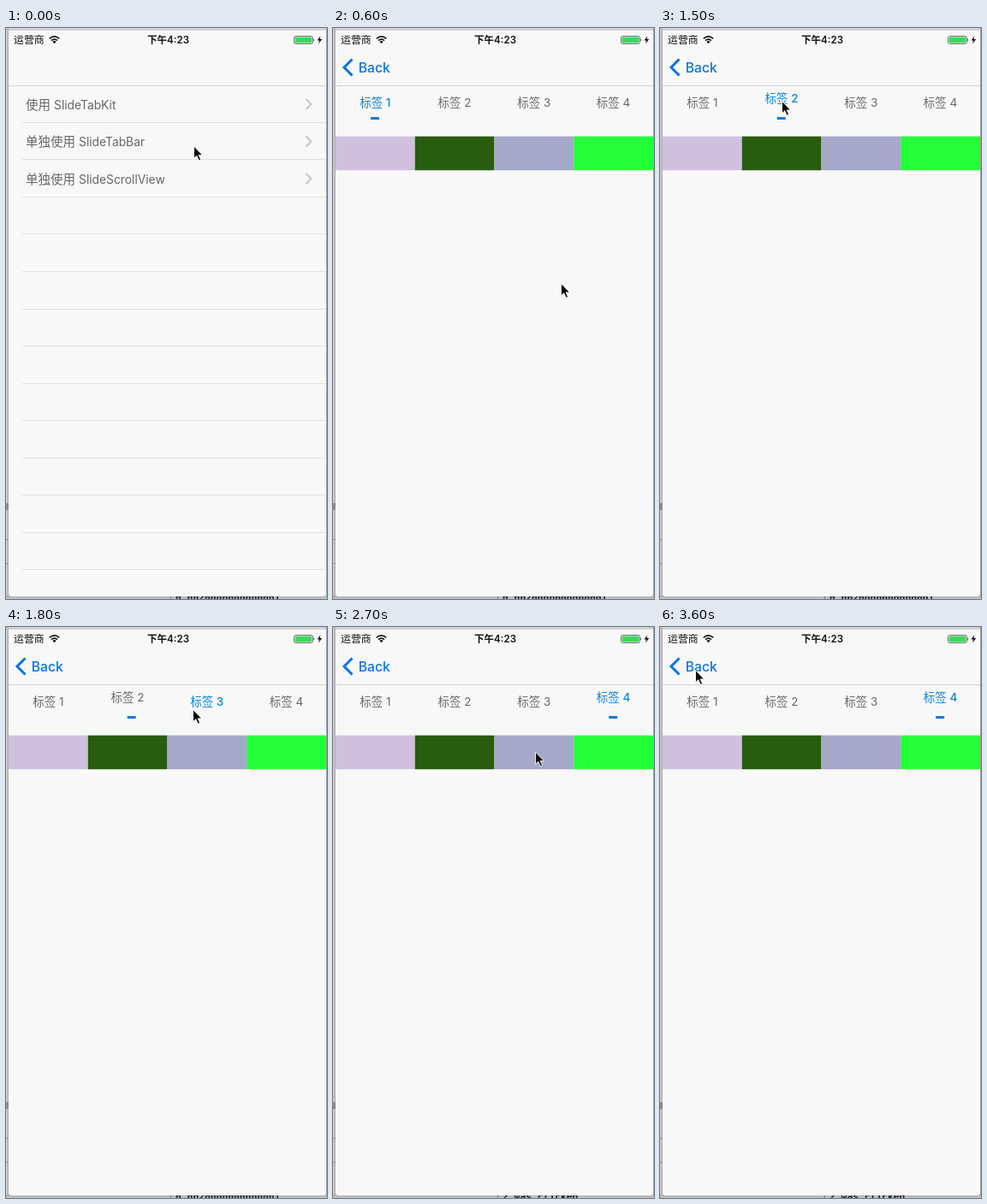
Recreate the animation shown at these times as an HTML page. Size 375 by 667 pixels, loop 3900 ms.

```html
<!DOCTYPE html>
<html lang="zh">
<head>
<meta charset="utf-8">
<style>
html, body { margin: 0; width: 100%; height: 100%; overflow: hidden; background: #d2d1d3; }
svg { display: block; font-family: Inter, "Noto Sans CJK SC", "Noto Sans CJK", sans-serif; }
</style>
</head>
<body>
<svg id="stage" width="375" height="667" viewBox="0 0 375 667">
  <defs>
    <linearGradient id="edge"><stop offset="0" stop-color="#d6d5d7"/><stop offset="1" stop-color="#aaa"/></linearGradient>
    <linearGradient id="under" x2="0" y2="1"><stop offset="0" stop-color="#a9a9a9"/><stop offset="1" stop-color="#c6c6c6"/></linearGradient>
    <clipPath id="screen"><path d="M3 3H374V660Q374 664 370 664H7Q3 664 3 660Z"/></clipPath>
    <clipPath id="content"><rect x="3" y="68" width="371" height="596"/></clipPath>
  </defs>
  <rect width="375" height="667" fill="#d2d1d3"/>
  <rect width="3" height="667" fill="url(#edge)"/>
  <path d="M0 555h3v8h-3z" fill="#8d8d8d"/>
  <path d="M0 597.5h3M0 625.5h3" stroke="#929292"/>
  <rect x="374" width="1" height="667" fill="#9c9c9c"/>
  <rect y="663" width="375" height="4" fill="url(#under)"/>
  <path d="M192.500 664v3" stroke="#777"/>
  <text id="log" x="198" y="668.500" font-size="11.300" font-weight="bold" fill="#222" style="font-family:'DejaVu Sans Mono',monospace"></text>
  <g clip-path="url(#screen)">
    <rect x="3" y="3" width="371" height="661" fill="#f8f8f8"/>
    <g clip-path="url(#content)">
      <g id="list"></g>
      <rect id="dim" x="3" y="68" width="371" height="596" opacity=".08"/>
      <g id="page"><rect x="3" y="68" width="371" height="596" fill="#f8f8f8"/></g>
    </g>
    <path d="M3 67.500H374" stroke="#d2d2d4"/>
    <g id="back" fill="#0b73e0">
      <path d="M22.500 36.500L13 46L22.500 55.500" fill="none" stroke="#0b73e0" stroke-width="3"/>
      <text x="29.800" y="51.500" font-size="15.700" font-weight="500">Back</text>
    </g>
    <g fill="#111">
      <text x="9" y="18.300" font-size="11.900">运营商</text>
      <text x="189.500" y="18.300" font-size="11.600" font-weight="600" text-anchor="middle">下午4:23</text>
      <path d="M50.800 12.300Q56.500 7.500 62.200 12.300M53 14.600Q56.500 11.500 60 14.600" fill="none" stroke="#111" stroke-width="1.700"/>
      <path d="M54.400 16Q56.500 14.200 58.600 16L56.500 18.300Z"/>
      <rect x="336.500" y="9.500" width="22" height="9" rx="2" fill="#fff" stroke="#555" stroke-width=".8"/>
      <rect x="337.500" y="10.500" width="20" height="7" rx="1" fill="#3fd660"/>
      <path d="M359.500 12.300q1.700 1.700 0 3.400z"/>
      <path d="M367.300 9.500L363.500 14.600H366L365 18.500L369.300 13H366.700Z"/>
    </g>
  </g>
  <path id="cursor" d="M0 0V14.200L3.300 11.200L5.700 16.700L8.100 15.700L5.700 10.400H10.100Z" fill="#080808" stroke="#fff" stroke-width=".9"/>
</svg>
<script>
const STEP = 300, STEPS = 13, TAB_WIDTH = 92.75, PUSH_GAP = 11.5, PARALLAX = 0.29;
const $ = id => document.getElementById(id);

function add(parent, tag, attrs, text = "") {
  const el = document.createElementNS("http://www.w3.org/2000/svg", tag);
  for (const key in attrs) el.setAttribute(key, attrs[key]);
  el.textContent = text;
  parent.appendChild(el);
  return el;
}

const list = $("list"), page = $("page");
const highlight = add(list, "rect", { x: 3, y: 111, width: 500, height: 43, fill: "#d2d2d2" });
for (let row = 0; row < 13; row++) {
  const y = Math.round(109.8 + row * 43.54) + 0.5;
  add(list, "path", { d: `M19 ${y}H374`, stroke: "#e0e0e1" });
}
[["使用", "SlideTabKit"], ["单独使用", "SlideTabBar"], ["单独使用", "SlideScrollView"]].forEach(([verb, name], row) => {
  const y = 94.5 + row * 43.5;
  const label = add(list, "text", { x: 23, y, "font-size": 14.5, fill: "#666" }, verb + " ");
  add(label, "tspan", { "font-size": 13.8 }, name);
  add(list, "path", { d: `M350.500 ${y - 11.5}l6 6l-6 6`, fill: "none", stroke: "#c4c4c8", "stroke-width": 1.8 });
});

const tabX = tab => 49.3 + tab * TAB_WIDTH;
const tabs = ["#cfc1de", "#295c0e", "#a6a8c8", "#25ff3b"].map((fill, i) => {
  add(page, "rect", { x: 3 + i * TAB_WIDTH, y: 126.6, width: TAB_WIDTH, height: 39.6, fill });
  return add(page, "text", { x: tabX(i), "font-size": 13.5, "text-anchor": "middle" }, `标签 ${i + 1}`);
});
const marker = add(page, "rect", { y: 104, width: 10, height: 3, fill: "#1878da" });

// Pointer keys: step, x, y
const pointer = [[0, 219.5, 138], [1, 269.5, 341.5], [2, 266.5, 298.5], [4, 140.5, 83.5], [5, 142.5, 85.5],
  [6, 218.5, 96.5], [7, 222.5, 95.5], [8, 326.5, 90.5], [9, 236.5, 146], [11, 236.5, 144.5], [12, 41.5, 50.5]];

function pointerAt(step) {
  const next = pointer.findIndex(key => key[0] >= step);
  const b = pointer[next], a = pointer[Math.max(0, next - 1)];
  const k = b[0] === a[0] ? 1 : (step - a[0]) / (b[0] - a[0]);
  return [1, 2].map(i => a[i] + (b[i] - a[i]) * k);
}

// "active" is the coloured tab, "raised" the lifted one, "at" the marker position
function tabState(step) {
  if (step < 5) return { active: 0, raised: -1, at: 0 };
  if (step < 6) return { active: 1, raised: 1, at: 1 };
  if (step < 7) return { active: 2, raised: 1, at: 1.053 };
  if (step < 8) return { active: 2, raised: 2, at: 2 };
  return { active: 3, raised: 3, at: 3 };
}

function draw(time) {
  const step = Math.floor(time / STEP) % STEPS;
  const pushing = step === 1, opened = step > 0;
  const gap = pushing ? PUSH_GAP : 0;
  const show = (el, on) => el.setAttribute("visibility", on ? "visible" : "hidden");
  const move = (el, x, y = 0) => el.setAttribute("transform", `translate(${x} ${y})`);

  show(page, opened);
  show($("back"), opened);
  show($("dim"), pushing);
  show(highlight, pushing);
  move(list, opened ? -PARALLAX * (371 - gap) : 0);
  move(page, gap);
  move($("back"), pushing ? 2 : 0);
  $("back").setAttribute("opacity", pushing ? 0.5 : 1);

  const { active, raised, at } = tabState(step);
  tabs.forEach((tab, i) => {
    tab.setAttribute("y", i === raised ? 87 : 92);
    tab.setAttribute("fill", i === active ? "#0d83d8" : "#6a6a6a");
    tab.setAttribute("font-weight", i === active ? 500 : 400);
  });
  marker.setAttribute("x", tabX(at) - 5.3);
  $("log").textContent = step < 8 ? "0.0020000000000001" : "2 was clicked";
  move($("cursor"), ...pointerAt(step));
}

const start = performance.now();
function tick() {
  draw(performance.now() - start);
  requestAnimationFrame(tick);
}
draw(0);
requestAnimationFrame(tick);
</script>
</body>
</html>
```
